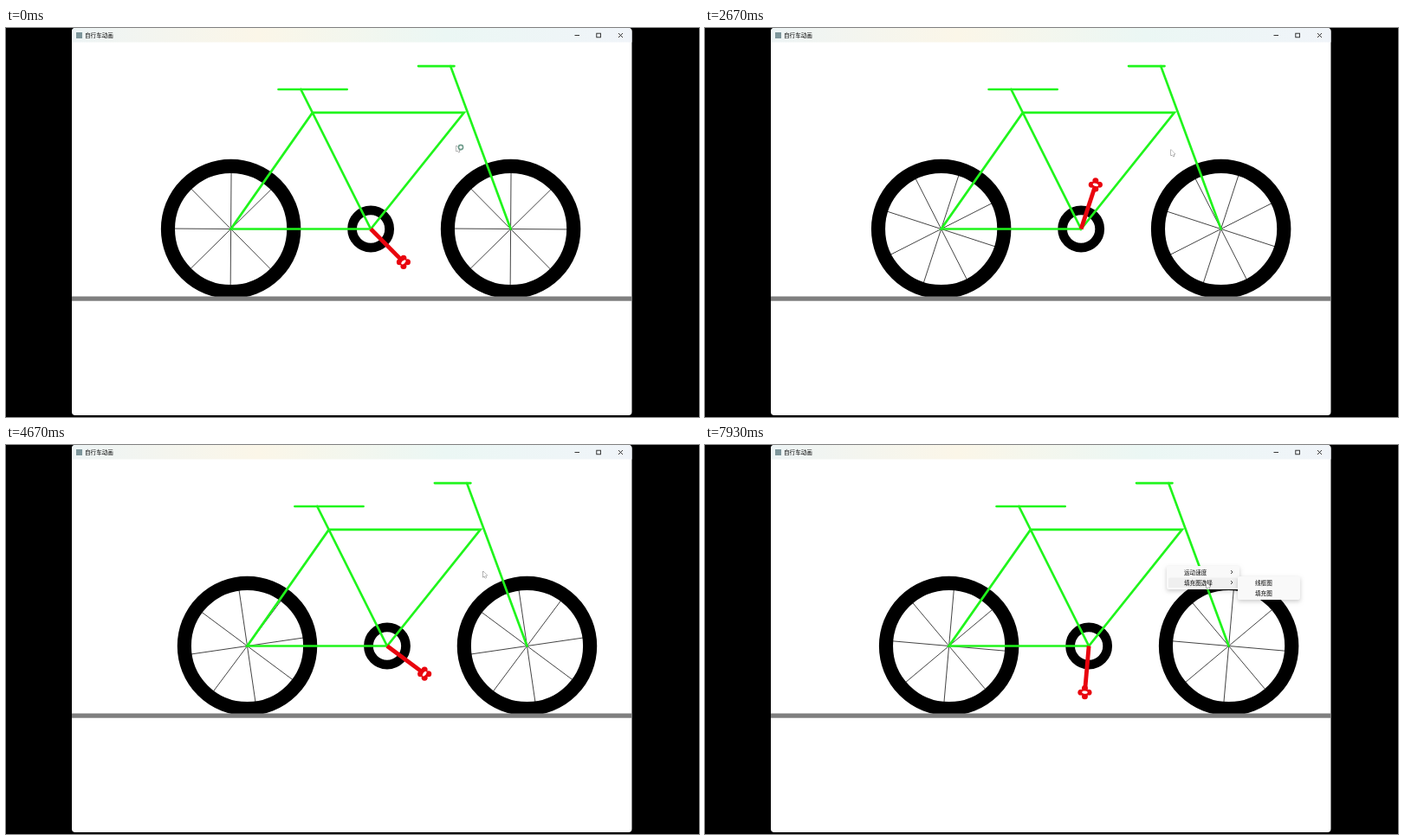
Write an HTML page with a canvas that moves like this. It is 800 by 450 pixels and loops after 8000 ms.

```html
<!DOCTYPE html>
<html lang="zh">
<head>
<meta charset="utf-8">
<style>
html, body { margin: 0; width: 100%; height: 100%; overflow: hidden; background: #000; }
canvas { display: block; }
</style>
</head>
<body>
<canvas id="stage" width="800" height="450"></canvas>
<script>
const c = document.getElementById('stage').getContext('2d');
const LOOP = 8, UNIT = 0.5383, RAD = Math.PI / 180;
const GREEN = '#20f51c', RED = '#e9040e';
const FONT = '500 6.6px "Noto Sans CJK SC", "Noto Sans CJK", sans-serif';
const SPEEDS = [178, 90, 40]; // crank degrees per second: high, medium, low
const ROWS = ['运动速度', '填充图选择'];
const SUBS = [['高', '中', '低'], ['线框图', '填充图']];

const clamp = (v, lo, hi) => Math.max(lo, Math.min(hi, v));

// Each menu freezes the bike while open; pick chooses the next speed,
// rest is where the pointer waits afterwards.
const menus = [
  { x: 528, y: 139, open: 0.51, close: 1.565, row: 0, pick: 0, rest: [538, 138] },
  { x: 538, y: 141, open: 2.77, close: 3.66, row: 0, pick: 1, rest: [561, 146] },
  { x: 546, y: 146, open: 4.91, close: 6.22, row: 0, pick: 2, rest: [539, 148] },
  { x: 533, y: 140, open: 7.14, close: 8.6, row: 1, pick: 0, rest: [533, 140] }
];

const path = [[0, 520, 136]];
for (const m of menus) {
  m.sub = m.open + 0.34 + 0.41 * m.row;
  path.push(
    [m.open, m.x, m.y],
    [m.sub, m.x + 27 + 18 * m.row, m.y + 4 + 15 * m.row],
    [m.close, m.x + 114, m.y + 8 + 12 * m.pick],
    [m.close + 0.4, ...m.rest],
    [m.close + 0.6, ...m.rest]
  );
}

function turned(t) {
  let degrees = 0, since = 0, speed = SPEEDS[1];
  for (const m of menus) {
    degrees += speed * (clamp(t, since, m.open) - since);
    since = m.close;
    speed = SPEEDS[m.pick];
  }
  return degrees;
}

function line(color, width, ...pts) {
  c.strokeStyle = color;
  c.lineWidth = width;
  c.beginPath();
  for (let i = 0; i < pts.length; i += 2) c.lineTo(pts[i], pts[i + 1]);
  c.stroke();
}

function ring(x, y, r, width, color = '#000') {
  c.strokeStyle = color;
  c.lineWidth = width;
  c.beginPath();
  c.arc(x, y, r, 0, 7);
  c.stroke();
}

function oval(x, y, rx, ry, angle, color) {
  c.fillStyle = color;
  c.beginPath();
  c.ellipse(x, y, rx, ry, angle, 0, 7);
  c.fill();
}

function box(x, y, w, h, r, color) {
  c.fillStyle = color;
  c.beginPath();
  c.roundRect(x, y, w, h, r);
  c.fill();
}

function text(s, x, y) {
  c.fillStyle = '#000';
  c.fillText(s, x, y);
}

function drawWindow() {
  box(0, 0, 800, 450, 0, '#000');
  box(76, 0, 646.5, 448, 4, '#fff');
  const g = c.createLinearGradient(76, 0, 722, 0);
  ['#edf4f5', '#fbf6e8', '#ebf7f4', '#f0f4f9']
    .forEach((color, i) => g.addColorStop(i / 3, color));
  box(76, 0, 646.5, 16.5, [4, 4, 0, 0], g);
  box(81, 5, 7, 7, 0, '#7d969b');
  text('自行车动画', 91, 8);
  line('#222', 0.9, 656.5, 8.5, 662, 8.5);
  c.strokeRect(681.8, 6.2, 4.6, 4.6);
  line('#222', 0.9, 707, 6, 712, 11);
  line('#222', 0.9, 712, 6, 707, 11);
}

function drawWheel(x, angle) {
  for (let i = 0; i < 4; i++) {
    const a = angle + i * 45 * RAD, dx = 122 * Math.cos(a), dy = 122 * Math.sin(a);
    line('#333', 1.7, x - dx, -dy, x + dx, dy);
  }
  ring(x, 0, 135, 30);
}

function drawPedal(angle) {
  const x = 100 * Math.cos(angle), y = 100 * Math.sin(angle);
  line(RED, 9, 0, 0, x * 0.93, y * 0.93);
  for (let i = 0; i < 4; i++) {
    const a = i * 90 * RAD;
    oval(x + 8.5 * Math.cos(a), y + 8.5 * Math.sin(a), 6.5, 6.5, 0, RED);
  }
  oval(x, y, 3, 6, angle, '#fff');
}

function drawBike(degrees) {
  const angle = (45.3 + degrees) * RAD;
  c.save();
  c.translate(421.1 + degrees / 18.6, 232.5);
  c.scale(UNIT, UNIT);
  drawWheel(-300, angle);
  drawWheel(300, angle);
  ring(0, 0, 40, 20);
  c.lineCap = 'round';
  line(GREEN, 5, 0, 0, -300, 0, -125, -250, 200, -250, 0, 0, -150, -300);
  line(GREEN, 5, -198, -300, -51, -300);
  line(GREEN, 5, 300, 0, 171, -350);
  line(GREEN, 5, 102, -350, 179, -350);
  c.lineCap = 'butt';
  drawPedal(angle);
  c.restore();
  box(76, 310.5, 646.5, 5.3, 0, '#7f7f7f');
}

function panel(x, y, w, items, active, textX, arrows) {
  c.save();
  c.shadowColor = 'rgba(0,0,0,.2)';
  c.shadowBlur = 5;
  c.shadowOffsetY = 2;
  box(x, y, w, items.length * 12 + 3, 2, '#f9f9f9');
  c.restore();
  items.forEach((item, i) => {
    const mid = y + 7 + i * 12;
    if (i === active) box(x + 2, mid - 5.5, w - 4, 11.4, 1.5, '#efefef');
    text(item, x + textX, mid);
    if (arrows) line('#333', 0.9, x + 74, mid - 2, x + 76, mid, x + 74, mid + 2);
  });
}

function drawMenu(m, t) {
  if (t < m.open || t >= m.close) return;
  const shown = t >= m.sub;
  c.globalAlpha = clamp((t - m.open) / 0.12, 0, 1);
  panel(m.x, m.y, 84, ROWS, shown ? m.row : 0, 20, true);
  if (shown) {
    const w = m.row ? 72 : 57;
    c.globalAlpha = m.row ? 1 : clamp((t - m.sub) / 0.15, 0, 1);
    panel(m.x + 141 - w + 13 * m.row, m.y + 12 * m.row, w, SUBS[m.row],
      t > m.close - 0.15 ? m.pick : -1, 18 + 2 * m.row);
  }
  c.globalAlpha = 1;
}

function drawPointer(t) {
  const i = path.findIndex(p => p[0] > t);
  const [t0, x0, y0] = path[i - 1], [t1, x1, y1] = path[i];
  const u = (t - t0) / (t1 - t0), ease = u * u * (3 - 2 * u);
  c.save();
  c.translate(x0 + (x1 - x0) * ease, y0 + (y1 - y0) * ease);
  c.fillStyle = '#fff';
  line('#555', 0.8, 0, 0, 0, 7, 1.6, 5.6, 2.7, 8, 3.7, 7.5, 2.7, 5.2, 4.8, 5, 0, 0);
  c.fill();
  if (t < 0.3) ring(5, 2, 2.6, 1.6, '#6f9c8c');
  c.restore();
}

function frame(now) {
  const t = now / 1000 % LOOP;
  c.font = FONT;
  c.textBaseline = 'middle';
  drawWindow();
  drawBike(turned(t));
  menus.forEach(m => drawMenu(m, t));
  drawPointer(t);
  requestAnimationFrame(frame);
}
requestAnimationFrame(frame);
</script>
</body>
</html>
```
